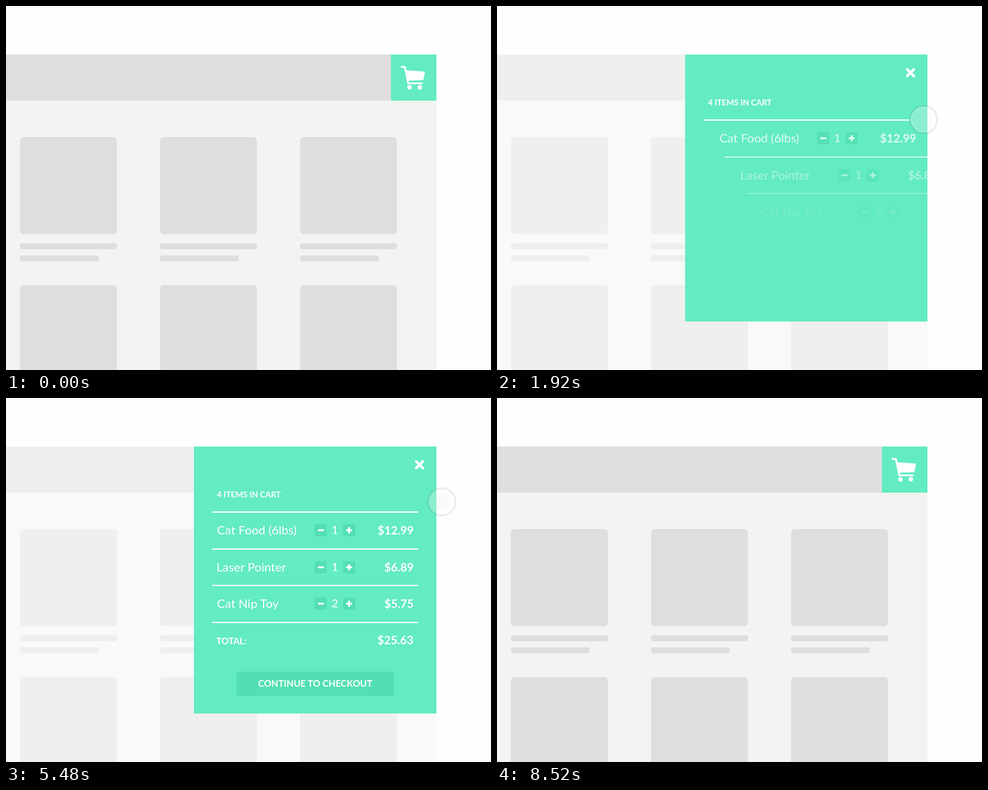
These frames come from a looping animation (800x600 px, 8.54 s). An HTML page:

```html
<!DOCTYPE html>
<html lang="en">
<head>
<meta charset="utf-8">
<title>Cart panel</title>
<style>
html, body { margin: 0; width: 100%; height: 100%; overflow: hidden; background: #d4d4d4; }
svg { display: block; }
.stage { position: relative; width: 800px; height: 600px; overflow: hidden; background: #fefefe; border-radius: 0 0 4px 4px; }
.stage * { animation-duration: 8540ms; animation-iteration-count: infinite; animation-timing-function: linear; }
.veil { position: absolute; inset: 0; background: #fff; opacity: 0; animation-name: veil; }
.panel { position: absolute; left: 310px; top: 80px; width: 400px; height: 440px; background: #63ebc2; animation-name: grow; }

text { font-family: Lato, "Open Sans", sans-serif; font-size: 20px; fill: #fff; }
.price { font-size: 19px; font-weight: 700; text-anchor: end; }
.qty { font-size: 18px; text-anchor: middle; }
.small { font-size: 13.3px; font-weight: 700; }
.total { font-size: 14.8px; font-weight: 700; }
.label { font-size: 15.1px; font-weight: 700; text-anchor: middle; }
.rule { fill: #fff; }
.dark { fill: #53dfb3; }
.stroke { fill: none; stroke: #fff; }

.cart { animation-name: cart; }
.close { opacity: 0; animation-name: close; }
.content { animation-name: content; }
.item { animation-name: slide; animation-delay: calc(var(--i) * 38ms); animation-fill-mode: backwards; }

.cx, .cy { position: absolute; left: 0; top: 0; }
.cx { animation-name: moveX; }
.cy { animation-name: moveY; }
.dot {
  position: absolute; left: -24px; top: -24px; width: 48px; height: 48px; box-sizing: border-box;
  border: 3px solid rgba(80, 80, 80, .1); border-radius: 50%;
  background: radial-gradient(circle, rgba(236, 236, 236, .34), rgba(255, 255, 255, .26) 65%) padding-box;
  box-shadow: inset 0 0 0 1px rgba(255, 255, 255, .35);
  animation-name: press;
}

@keyframes veil {
  0%, 18.03% { opacity: 0; animation-timing-function: ease-in-out; }
  22.6%, 70.96% { opacity: .52; animation-timing-function: ease-in-out; }
  75.53%, 100% { opacity: 0; }
}
@keyframes grow {
  0%, 18.03% { clip-path: inset(0 0 364px 325px); animation-timing-function: ease-in-out; }
  22.6%, 70.96% { clip-path: inset(0 0 0 0); animation-timing-function: ease-in-out; }
  75.53%, 100% { clip-path: inset(0 0 364px 325px); }
}
@keyframes cart {
  0%, 17.6% { opacity: 1; }
  18.9%, 73.8% { opacity: 0; }
  75.5%, 100% { opacity: 1; }
}
@keyframes close {
  0%, 19.2% { opacity: 0; }
  21.1%, 70.8% { opacity: 1; }
  72.4%, 100% { opacity: 0; }
}
@keyframes content {
  0%, 70.8% { opacity: 1; }
  72.4%, 94% { opacity: 0; }
  95%, 100% { opacity: 1; }
}
@keyframes slide {
  0%, 18.49% { transform: translateX(100px); opacity: 0; animation-timing-function: cubic-bezier(.37, 0, .63, 1); }
  22.24%, 88% { transform: none; opacity: 1; }
  88.01%, 100% { transform: translateX(100px); opacity: 0; }
}
@keyframes moveX {
  0%, .7% { transform: translateX(830px); animation-timing-function: ease-in-out; }
  9.37%, 18.97% { transform: translateX(667px); animation-timing-function: ease-in-out; }
  26.23%, 60.66% { transform: translateX(744px); animation-timing-function: cubic-bezier(.5, 0, .65, 1); }
  67.68%, 78.45% { transform: translateX(682px); animation-timing-function: cubic-bezier(.5, 0, .65, 1); }
  87.24%, 100% { transform: translateX(830px); }
}
@keyframes moveY {
  0%, .7% { transform: translateY(260px); animation-timing-function: ease-in-out; }
  9.37%, 18.97% { transform: translateY(119px); animation-timing-function: cubic-bezier(.3, 0, .5, 1); }
  26.23%, 60.66% { transform: translateY(233px); animation-timing-function: ease-in-out; }
  67.68%, 78.45% { transform: translateY(110px); animation-timing-function: ease-in-out; }
  87.24%, 100% { transform: translateY(260px); }
}
@keyframes press {
  0%, 16.86% { transform: scale(1); }
  17.56% { transform: scale(.88); }
  18.5%, 68.6% { transform: scale(1); }
  69.4% { transform: scale(.88); }
  70.4%, 100% { transform: scale(1); }
}
</style>
</head>
<body>
<div class="stage">
  <svg width="800" height="600">
    <defs>
      <g id="product" fill="#dededc">
        <rect width="160" height="160" rx="6"/>
        <rect y="175" width="160" height="10" rx="4"/>
        <rect y="195" width="130" height="10" rx="4"/>
      </g>
      <g id="stepper">
        <rect class="dark" x="509" y="-10" width="20" height="20" rx="3"/>
        <rect class="dark" x="556" y="-10" width="20" height="20" rx="3"/>
        <path class="stroke" stroke-width="3" d="M514.5 0h10M561 0h10M566-5v10"/>
      </g>
    </defs>
    <rect y="80" width="710" height="520" fill="#f3f3f1"/>
    <rect y="80" width="710" height="76" fill="#dededc"/>
    <use href="#product" x="23" y="216"/>
    <use href="#product" x="254" y="216"/>
    <use href="#product" x="485" y="216"/>
    <use href="#product" x="23" y="460"/>
    <use href="#product" x="254" y="460"/>
    <use href="#product" x="485" y="460"/>
  </svg>
  <div class="veil"></div>
  <div class="panel">
    <svg width="400" height="440" viewBox="310 80 400 440">
      <g class="cart" fill="#fff">
        <path class="stroke" stroke-width="3" stroke-linecap="round" stroke-linejoin="round" d="M652.5 100.3l5.5.5 5.5 26.7H686"/>
        <path stroke="#fff" stroke-width="2" stroke-linejoin="round" d="M660 107l30 2-2.5 12.2-23.5.8z"/>
        <circle cx="665.5" cy="134" r="3.7"/>
        <circle cx="682.5" cy="134" r="3.7"/>
      </g>
      <path class="close stroke" stroke-width="4.4" stroke-linecap="round" d="M676.5 104.500l11 11m0-11l-11 11"/>
      <g class="content">
        <text class="item small" style="--i:0" x="348" y="163.500">4 ITEMS IN CART</text>
        <rect class="item rule" style="--i:1" x="340" y="187" width="340" height="2"/>
        <g class="item" style="--i:3">
          <text x="348" y="225">Cat Food (6lbs)</text>
          <use href="#stepper" y="218"/>
          <text class="qty" x="542.5" y="224">1</text>
          <text class="price" x="672.5" y="225">$12.99</text>
        </g>
        <rect class="item rule" style="--i:4" x="340" y="248" width="340" height="2"/>
        <g class="item" style="--i:5">
          <text x="347" y="286">Laser Pointer</text>
          <use href="#stepper" y="279"/>
          <text class="qty" x="542.5" y="285">1</text>
          <text class="price" x="672.5" y="286">$6.89</text>
        </g>
        <rect class="item rule" style="--i:6" x="340" y="308" width="340" height="2"/>
        <g class="item" style="--i:7">
          <text x="348" y="346">Cat Nip Toy</text>
          <use href="#stepper" y="339"/>
          <text class="qty" x="542.5" y="345">2</text>
          <text class="price" x="672.5" y="346">$5.75</text>
        </g>
        <rect class="item rule" style="--i:8" x="340" y="369" width="340" height="2"/>
        <g class="item" style="--i:9">
          <text class="total" x="347" y="406">TOTAL:</text>
          <text class="price" x="672" y="406">$25.63</text>
        </g>
        <g class="item" style="--i:10">
          <rect class="dark" x="380" y="451" width="260" height="40" rx="5"/>
          <text class="label" x="510" y="476">CONTINUE TO CHECKOUT</text>
        </g>
      </g>
    </svg>
  </div>
  <div class="cx"><div class="cy"><div class="dot"></div></div></div>
</div>
</body>
</html>
```
